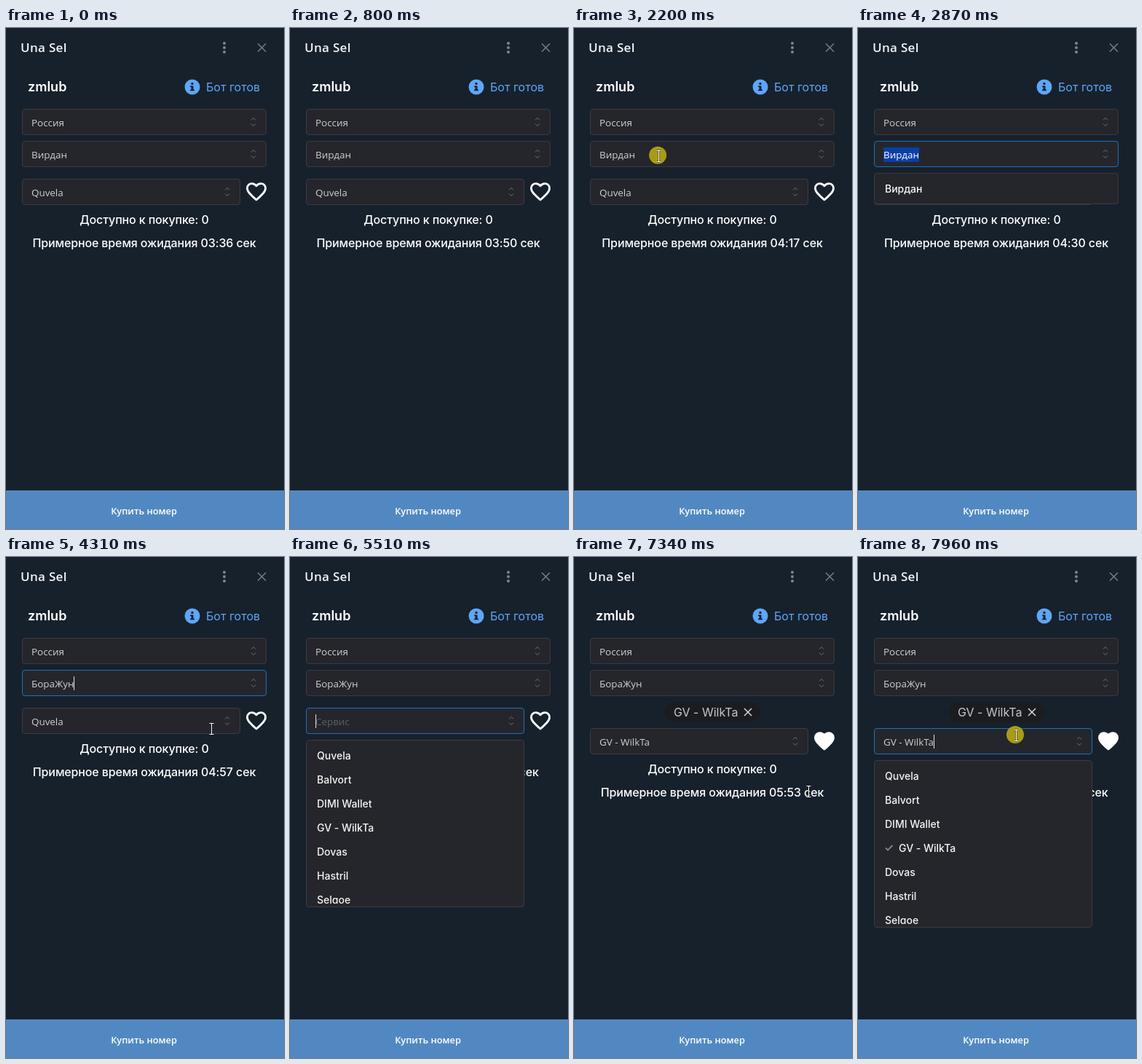
These frames come from a looping animation (382 px wide and 688 px high, 7990 ms). An HTML page with a canvas:

```html
<!DOCTYPE html>
<html lang="ru">
<head>
<meta charset="utf-8">
<title>Una Sel</title>
<style>
html, body { margin: 0; width: 100%; height: 100%; overflow: hidden; background: #17212b; }
canvas { display: block; width: 382px; height: 688px; }
</style>
</head>
<body>
<canvas id="stage"></canvas>
<script>
const W = 382, H = 688, LOOP = 7990;
const canvas = document.getElementById('stage');
const ctx = canvas.getContext('2d');
const dpr = window.devicePixelRatio || 1;
canvas.width = W * dpr;
canvas.height = H * dpr;

const INTER = 'Inter, sans-serif';
const OPEN = '"Open Sans", sans-serif';
const FIELD_FONT = `13.4px ${OPEN}`;
const BG = '#17212b', PANEL = '#25262b', EDGE = '#3a3b40', FOCUS = '#1971c2', BLUE = '#5ea6f8';

const OPERATORS = ['Любой', 'Вирдан', 'БораЖун', 'Сотал', 'Ладэн', 'Рокта', 'Мирусв'];
const SERVICES = ['Quvela', 'Balvort', 'DIMI Wallet', 'GV - WilkTa', 'Dovas', 'Hastril', 'Selgoe'];
const [OLD_OP, NEW_OP] = [OPERATORS[1], OPERATORS[2]];
const [OLD_SERVICE, NEW_SERVICE] = [SERVICES[0], SERVICES[3]];

// Moments of the user's actions, ms
const T = {
  enter: 900, openOp: 2250, dragOp: 2540, clearOp: 2960, showOp: 3080, pickOp: 3860,
  openSvc: 4640, dragSvc: 5000, clearSvc: 5340, showSvc: 5700, pickSvc: 6450,
  like: 7030, reopen: 7850
};

// Elapsed time on the counter: [ms, seconds]
const CLOCK = [[0, 216.3], [1450, 242.3], [2870, 270.3], [4310, 297.3], [6720, 342.3], [7990, 366]];

// Pointer path: [ms, x, y]
const PATH = [
  [900, 300, 694], [1050, 290, 640], [1450, 144, 258], [1680, 140, 186], [2000, 118, 176],
  [2540, 112, 175], [2800, -24, 178], [2960, -24, 178], [3080, 20, 215], [3500, 74, 288], [3920, 76, 287],
  [4310, 282, 236], [4580, 176, 228], [5000, 112, 226], [5260, -24, 228], [5340, -24, 228], [5700, 18, 300],
  [5820, 30, 320], [6250, 84, 370], [6500, 88, 371], [6720, 331, 262], [6950, 342, 226],
  [7080, 342, 226], [7260, 338, 338], [7440, 300, 300], [7750, 217, 245], [7990, 217, 245]
];
const CLICKS = [T.openOp, T.pickOp, T.openSvc, T.pickSvc, T.like, T.reopen + 80];

const HEART = new Path2D('M12 20C6.2 14.8 3 11.8 3 8.5C3 5.9 5 4 7.5 4C9.3 4 11 5 12 6.3' +
  'C13 5 14.7 4 16.5 4C19 4 21 5.9 21 8.5C21 11.8 17.8 14.8 12 20Z');

function sample(keys, t, col, ease = u => u) {
  let i = 0;
  while (i < keys.length - 2 && keys[i + 1][0] <= t) i++;
  const a = keys[i], b = keys[i + 1];
  const u = Math.min(1, Math.max(0, (t - a[0]) / (b[0] - a[0])));
  return a[col] + (b[col] - a[col]) * ease(u);
}
const smooth = u => u * u * (3 - 2 * u);
const between = (t, a, b) => t >= a && t < b;

function text(str, x, y, font, color, align = 'left', spacing = 0) {
  ctx.font = font;
  ctx.fillStyle = color;
  ctx.textAlign = align;
  ctx.letterSpacing = `${spacing}px`;
  ctx.fillText(str, x, y);
}

function box(x, y, w, h, r, fill, edge) {
  ctx.beginPath();
  ctx.roundRect(x + .5, y + .5, w - 1, h - 1, r);
  ctx.fillStyle = fill;
  ctx.fill();
  if (edge) {
    ctx.strokeStyle = edge;
    ctx.lineWidth = 1;
    ctx.stroke();
  }
}

function disc(x, y, r, color) {
  ctx.beginPath();
  ctx.arc(x, y, r, 0, Math.PI * 2);
  ctx.fillStyle = color;
  ctx.fill();
}

function line(points, color, width) {
  ctx.beginPath();
  points.forEach(([x, y], i) => i ? ctx.lineTo(x, y) : ctx.moveTo(x, y));
  ctx.strokeStyle = color;
  ctx.lineWidth = width;
  ctx.stroke();
}

function cross(x, y, r, color, width) {
  line([[x - r, y - r], [x + r, y + r]], color, width);
  line([[x + r, y - r], [x - r, y + r]], color, width);
}

function field(y, w, value, { focus, caret, selectFrom, hint } = {}) {
  box(22, y, w, 36, 3.5, PANEL, focus ? FOCUS : EDGE);
  const cx = 22 + w - 18, cy = y + 18;
  line([[cx - 3, cy - 2.5], [cx, cy - 5.5], [cx + 3, cy - 2.5]], '#707176', 1);
  line([[cx - 3, cy + 2.5], [cx, cy + 5.5], [cx + 3, cy + 2.5]], '#707176', 1);
  text(value || hint, 35, y + 24, FIELD_FONT, value ? '#cfd0d3' : '#5c5f66');
  const end = 35 + (value ? ctx.measureText(value).width : 0);
  if (selectFrom < end) {
    const x = Math.max(35, selectFrom);
    ctx.save();
    ctx.beginPath();
    ctx.rect(x, y + 9, end - x, 20);
    ctx.clip();
    ctx.fillStyle = '#0a3ea6';
    ctx.fillRect(x, y + 9, end - x, 20);
    text(value, 35, y + 24, FIELD_FONT, '#ffffff');
    ctx.restore();
  } else if (caret) {
    ctx.fillStyle = '#e4e4e6';
    ctx.fillRect(Math.round(end), y + 9, 1, 19);
  }
}

function list(y, w, items, pointer, checked) {
  const h = items.length > 1 ? 230 : 43;
  box(22, y, w, h, 3.5, PANEL, EDGE);
  ctx.save();
  ctx.beginPath();
  ctx.rect(23, y + 5, w - 2, h - 10);
  ctx.clip();
  items.forEach((item, i) => {
    const top = y + 5 + i * 33;
    const inside = pointer && pointer.x > 27 && pointer.x < 17 + w;
    if (inside && pointer.y >= top && pointer.y < top + 33) {
      box(27, top, w - 10, 33, 4, '#2f3136');
    }
    const on = item === checked;
    if (on) line([[38, top + 16.5], [41, top + 19.5], [47.5, top + 13]], '#85868a', 1.8);
    text(item, on ? 56 : 37, top + 22, `500 14px ${INTER}`, '#f6f6f7');
  });
  ctx.restore();
}

function heart(x, y, filled) {
  ctx.save();
  ctx.translate(x, y);
  ctx.scale(1.4, 1.4);
  ctx.translate(-12, -12.1);
  ctx.lineJoin = 'round';
  ctx.lineWidth = 2;
  ctx.strokeStyle = ctx.fillStyle = '#ffffff';
  if (filled) ctx.fill(HEART);
  ctx.stroke(HEART);
  ctx.restore();
}

function header() {
  text('Una Sel', 20, 33, `600 17px ${OPEN}`, '#f3f5f7', 'left', .3);
  [21, 27, 33].forEach(y => disc(300, y, 2, '#7b8690'));
  cross(351.5, 27, 5.5, '#75808b', 1.4);
  text('zmlub', 30, 87, `600 18px ${INTER}`, '#ffffff');
  disc(256, 81, 10.5, BLUE);
  disc(256, 76.4, 1.7, BG);
  ctx.fillStyle = BG;
  ctx.fillRect(254.5, 79.5, 3, 6);
  ctx.fillRect(253, 79.5, 2, 1.6);
  ctx.fillRect(253, 84.5, 6, 1.7);
  text('Бот готов', 275, 87, `16px ${INTER}`, BLUE);
}

function tag() {
  box(124, 199, 132, 28, 14, '#1b1c1f');
  text(NEW_SERVICE, 137, 219, `16px ${INTER}`, '#c6c7ca');
  cross(239, 213, 5, '#d8d9db', 1.5);
}

function beam(x, y) {
  const cx = Math.round(x) + .5, cy = Math.round(y);
  for (const [color, width] of [['#17181a', 1.8], ['#ffffff', 1]]) {
    line([[cx, cy - 7], [cx, cy + 7]], color, width);
    line([[cx - 3, cy - 7.5], [cx + 3, cy - 7.5]], color, width);
    line([[cx - 3, cy + 7.5], [cx + 3, cy + 7.5]], color, width);
  }
}

function arrow(x, y) {
  ctx.beginPath();
  [[0, 0], [0, 15.5], [3.6, 12.2], [6, 17.6], [8.4, 16.5], [6.1, 11.3], [10.8, 11]]
    .forEach(([dx, dy]) => ctx.lineTo(x + dx, y + dy));
  ctx.closePath();
  ctx.fillStyle = '#ffffff';
  ctx.fill();
  ctx.strokeStyle = '#101114';
  ctx.lineWidth = 1;
  ctx.stroke();
}

function overText({ x, y }, dy, listTop, listBottom) {
  if (y > listTop && y < listBottom && x < 358) return false;
  const hit = (l, t, r, b) => x > l && x < r && y > t && y < b;
  return hit(22, 111, 358, 147) || hit(22, 155, 358, 191) ||
    hit(22, 207 + dy, 322, 243 + dy) ||
    hit(102, 250 + dy, 278, 275 + dy) || hit(36, 284 + dy, 344, 308 + dy);
}

function draw(t) {
  ctx.setTransform(dpr, 0, 0, dpr, 0, 0);
  ctx.fillStyle = BG;
  ctx.fillRect(0, 0, W, H);
  header();

  const pointer = { x: sample(PATH, t, 1, smooth), y: sample(PATH, t, 2, smooth) };
  const visible = t >= T.enter && !between(t, T.clearOp, T.showOp) && !between(t, T.clearSvc, T.showSvc);
  const liked = t >= T.like;
  const dy = liked ? 28 : 0;

  const opOpen = between(t, T.openOp, T.pickOp);
  const opValue = t < T.clearOp ? OLD_OP : t < T.pickOp ? '' : NEW_OP;
  const opFocus = between(t, T.openOp, T.openSvc);
  const svcOpen = between(t, T.openSvc, T.pickSvc) || t >= T.reopen;
  const svcValue = t < T.clearSvc ? OLD_SERVICE : t < T.pickSvc ? '' : NEW_SERVICE;
  const svcFocus = between(t, T.openSvc, T.like) || t >= T.reopen;

  field(111, 336, 'Россия');
  field(155, 336, opValue, {
    focus: opFocus, caret: opFocus, hint: 'Оператор',
    selectFrom: between(t, T.dragOp, T.clearOp) ? pointer.x : W
  });
  if (liked) tag();
  field(207 + dy, 300, svcValue, {
    focus: svcFocus, caret: svcFocus, hint: 'Сервис',
    selectFrom: between(t, T.dragSvc, T.clearSvc) ? pointer.x : W
  });
  heart(344, 225 + dy, liked);

  const s = Math.floor(sample(CLOCK, t, 1));
  const pad = n => String(n).padStart(2, '0');
  const wait = `${pad(Math.floor(s / 60))}:${pad(s % 60)}`;
  const info = (str, y) => text(str, 190, y + dy, `500 16px ${INTER}`, '#ffffff', 'center', -.12);
  info('Доступно к покупке: 0', 269);
  info(`Примерное время ожидания ${wait} сек`, 301);

  let listTop = H, listBottom = H;
  const hover = visible ? pointer : null;
  if (opOpen) {
    const full = t >= T.clearOp;
    listTop = 199;
    listBottom = full ? 429 : 242;
    list(listTop, 336, full ? OPERATORS : [OLD_OP], hover);
  } else if (svcOpen) {
    const full = t >= T.clearSvc;
    listTop = 251 + dy;
    listBottom = listTop + (full ? 230 : 43);
    list(listTop, 300, full ? SERVICES : [OLD_SERVICE], hover, svcValue && full ? NEW_SERVICE : null);
  }

  ctx.fillStyle = '#5288c1';
  ctx.fillRect(0, 635, W, 53);
  text('Купить номер', 189.5, 668, `600 12.75px ${OPEN}`, '#ffffff', 'center');

  if (!visible) return;
  if (CLICKS.some(c => Math.abs(t - c) < 70)) {
    disc(pointer.x - 1, pointer.y - 1, 12, 'rgba(190,176,20,.86)');
  }
  (overText(pointer, dy, listTop, listBottom) ? beam : arrow)(pointer.x, pointer.y);
}

const start = performance.now();
function frame() {
  draw((performance.now() - start) % LOOP);
  requestAnimationFrame(frame);
}
frame();
</script>
</body>
</html>
```
